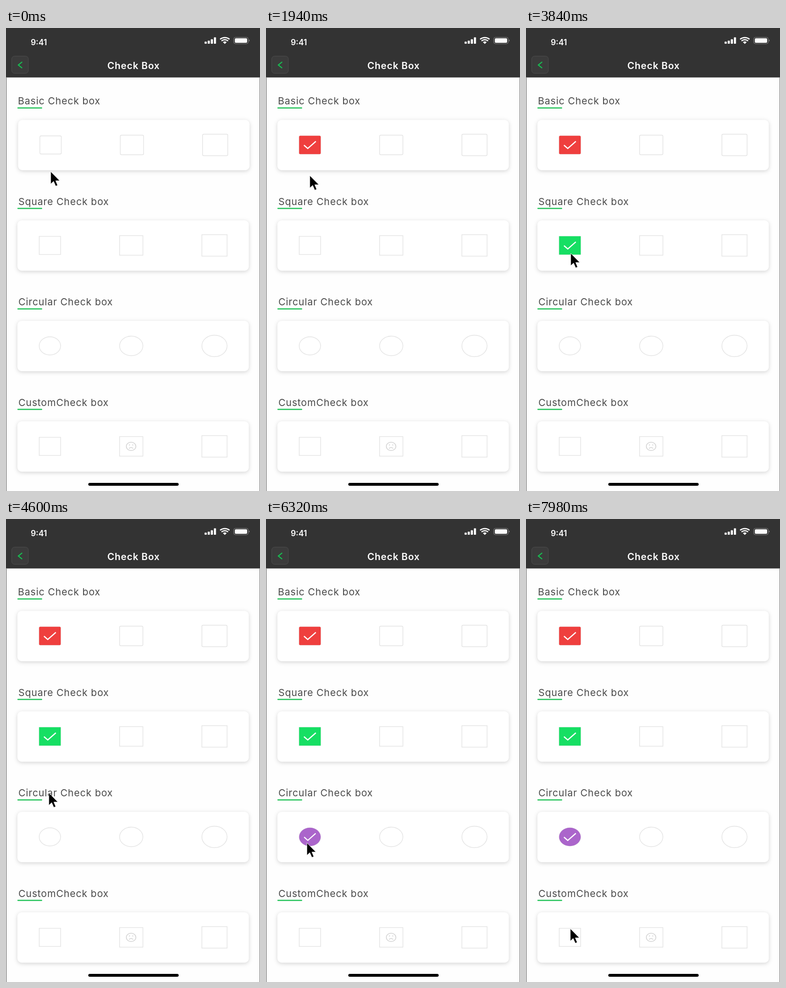
An HTML page that plays this animation: 534 px wide and 970 px high, repeating every 8 s.

```html
<!DOCTYPE html>
<html lang="en">
<head>
<meta charset="utf-8">
<title>Check Box</title>
<style>
  html, body { margin: 0; width: 100%; height: 100%; overflow: hidden; background: #fefefe; }
  svg { display: block; width: 100vw; height: 100vh; }
  text { font-family: Inter, "Open Sans", sans-serif; }
  .label { font-size: 20.5px; letter-spacing: .8px; fill: #4a4a4a; }
  .box { fill: none; stroke: #e4e4e4; stroke-width: 1.4; }
  .card { fill: #fff; filter: drop-shadow(0 2px 4px rgba(0, 0, 0, .17)); }
</style>
</head>
<body>
<svg id="stage" viewBox="0 0 534 970">
  <rect width="534" height="970" fill="#fefefe"/>
  <path d="M.5 104V970" stroke="#555"/>
  <path d="M533.5 104V970" stroke="#777"/>
  <rect width="534" height="103.6" fill="#333"/>

  <g fill="#fff">
    <text x="52" y="36" font-size="17" font-weight="600">9:41</text>
    <text x="213" y="86" font-size="20" font-weight="600" letter-spacing=".8">Check Box</text>
    <rect x="417.5" y="28.5" width="4.5" height="4.5" rx="1"/>
    <rect x="424" y="26.5" width="4.5" height="6.5" rx="1"/>
    <rect x="430.5" y="23.5" width="4.5" height="9.5" rx="1"/>
    <rect x="437" y="19.5" width="4.5" height="13.5" rx="1"/>
    <path d="M456 29.5Q460 26.5 464 29.5L460 33.5Z"/>
    <rect x="481" y="21.5" width="26" height="9.5" rx="2.5"/>
    <path d="M511 24q2 2.2 0 4.4z" opacity=".6"/>
  </g>
  <g fill="none" stroke="#fff" stroke-width="2.4">
    <path d="M450 23.5Q460 16.5 470 23.5M453 27Q460 22 467 27"/>
    <rect x="478.5" y="19.5" width="31" height="13.5" rx="4" stroke="#848484" stroke-width="1"/>
  </g>
  <rect x="12" y="59" width="35" height="36" rx="6" fill="#3b3b3b" stroke="#4c4c4c"/>
  <path d="M34 71L26 77.5L34 84" fill="none" stroke="#15c552" stroke-width="2.2"/>

  <g id="rows"></g>
  <rect x="173" y="953" width="190" height="6" rx="3"/>

  <path id="arrow" d="M0 0V26L6 20.5L10.5 30.5L14.5 28.8L10.5 19.2H19Z" stroke="#fff" stroke-width=".8"/>
  <path id="hand" fill="#e6e6e6" stroke="#111" stroke-width="1.8" stroke-linejoin="round" stroke-linecap="round"
    d="M8 15V3.5C8 .3 12.8 .3 12.8 3.5V11V8.5C14 6.8 17.3 7 17.5 9.5V11.5V9.8C19 8.3 22 8.7 22.2 11V12.5V11.5C24 10.2 27 11 27 13.5V18.5C27 23.5 22.5 26.5 17.5 26.5C11 26.5 8.5 23.5 6.5 20.5L1.5 16.5C0 14.5 2.5 12.3 5 13.5Z"/>
</svg>
<script>
const LOOP = 8000, ROW_STEP = 210.5, CHECK_MS = 800;
const labels = ["Basic Check box", "Square Check box", "Circular Check box", "CustomCheck box"];
const clicks = [
  { at: 1060, color: "#ef3f3e" },
  { at: 3480, color: "#16df63" },
  { at: 6060, color: "#ab65cb" },
];
const sizes = [{ x: 92.3, w: 45, h: 38 }, { x: 263.3, w: 49, h: 41 }, { x: 438.3, w: 53, h: 45 }];

// Each move runs from one tip position to the next; the hand shows from `hoverY` down.
const moves = [
  { start: 0, end: 400, from: [94, 301], to: [93.5, 264] },
  { start: 400, end: 1060, from: [94, 272], to: [94, 272], hoverY: 0 },
  { start: 1060, end: 1820, from: [91.5, 261], to: [91.5, 261] },
  { start: 1820, end: 2980, from: [91.5, 261], to: [94, 472], hoverY: 436 },
  { start: 2980, end: 3480, from: [94, 472], to: [94, 472], hoverY: 0 },
  { start: 3480, end: 4280, from: [94, 472], to: [94, 472] },
  { start: 4280, end: 5560, from: [94, 472], to: [86, 678.5], hoverY: 647 },
  { start: 5560, end: 6060, from: [86, 678.5], to: [86, 678.5], hoverY: 0 },
  { start: 6060, end: 7210, from: [86, 678.5], to: [86, 678.5] },
  { start: 7210, end: 8470, from: [86, 678.5], to: [94, 880] },
];

const $ = id => document.getElementById(id);
const clamp = v => Math.min(1, Math.max(0, v));
const easeOut = (p, power) => 1 - (1 - clamp(p)) ** power;
const mix = (a, b, p) => a + (b - a) * p;
const place = (el, x, y, scale = 1) =>
  el.setAttribute("transform", `translate(${x} ${y}) scale(${scale})`);

function boxShape(row, { x, w, h }, attrs, y = 245) {
  return row === 2
    ? `<ellipse cx="${x}" cy="${y}" rx="${w / 2}" ry="${h / 2}" ${attrs}/>`
    : `<rect x="${x - w / 2}" y="${y - h / 2}" width="${w}" height="${h}" rx="${row ? 0 : 2.5}" ${attrs}/>`;
}

const face = `<g fill="none" stroke="#d2d2d2" stroke-width="1.5">
  <ellipse cx="263" cy="245" rx="10" ry="8.8"/><path d="M258.5 249.5Q263 245 267.5 249.5"/>
  <path d="M258.5 242h2M265.5 242h2" stroke-width="2.2"/></g>`;

function rowMarkup(label, row) {
  const checked = clicks[row] ? `<g id="mark${row}">
    <g id="fill${row}">${boxShape(row, { x: 0, w: 45.5, h: 38.5 }, `fill="${clicks[row].color}"`, 0)}</g>
    <path id="tick${row}" d="M-12.5 .5L-4.5 7.5L12.5 -7.5" fill="none" stroke="#fff" stroke-width="2.4"/></g>` : "";
  return `<g transform="translate(0 ${row * ROW_STEP})">
    <text class="label" x="${row ? 26 : 25}" y="160">${label}</text>
    <rect x="24" y="166.3" width="52" height="2.4" rx="1" fill="#25c35a"/>
    <g id="card${row}">
      <rect class="card" x="24" y="192.5" width="486.5" height="105.5" rx="9"/>
      ${sizes.map(s => boxShape(row, s, 'class="box"')).join("")}
      ${row === 3 ? face : ""}${checked}
    </g></g>`;
}
$("rows").innerHTML = labels.map(rowMarkup).join("");

function render(t) {
  clicks.forEach(({ at }, row) => {
    const p = easeOut((t - at) / CHECK_MS, 8);
    $("mark" + row).style.display = t >= at ? "" : "none";
    place($("fill" + row), 92.3, 245, mix(.95, 1, p));
    place($("tick" + row), 92.3, 245, mix(.27, 1, p));
    if (row === 0) place($("card0"), mix(1.5, 0, p), 0);
  });

  const move = moves.find(m => t < m.end);
  const p = easeOut((t - move.start) / (move.end - move.start), 2.35);
  const [x, y] = move.from.map((v, i) => mix(v, move.to[i], p));
  const hovering = y >= (move.hoverY ?? Infinity);
  place($("arrow"), x, y);
  place($("hand"), x + 5.5, y + .5);
  $("arrow").style.display = hovering ? "none" : "";
  $("hand").style.display = hovering ? "" : "none";
}

function frame() {
  render(performance.now() % LOOP);
  requestAnimationFrame(frame);
}
frame();
</script>
</body>
</html>
```
